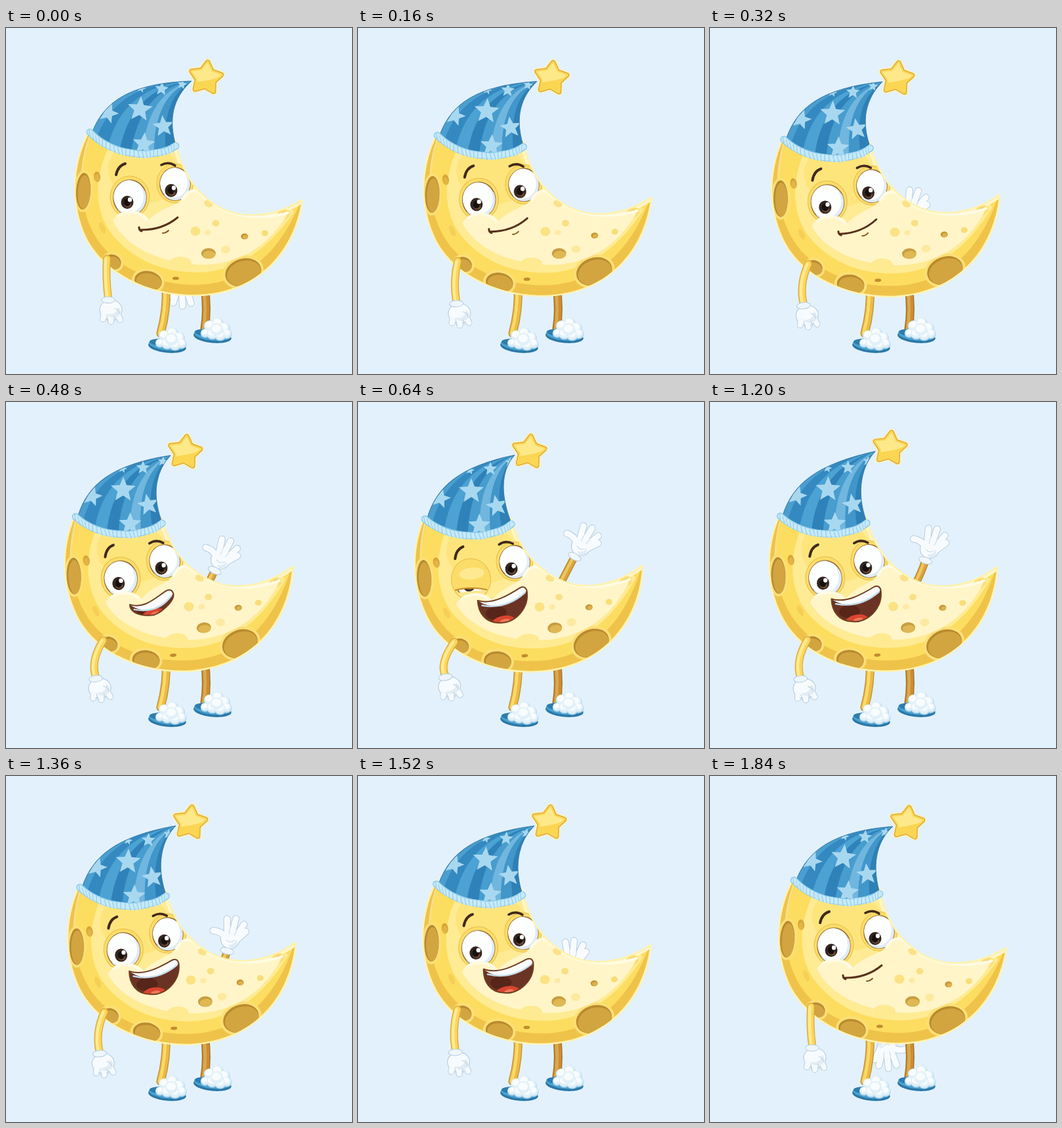
An HTML page with a canvas that plays this animation: 528x528 px, repeating every 1.92 s.

```html
<!DOCTYPE html>
<html lang="en">
<head>
<meta charset="utf-8">
<title>Waving moon</title>
<style>
html, body { margin: 0; width: 100%; height: 100%; overflow: hidden; background: #e3f1fd; }
canvas { display: block; width: 100vw; height: 100vh; }
</style>
</head>
<body>
<canvas id="stage" width="528" height="528"></canvas>
<script>
const ctx = document.getElementById('stage').getContext('2d');
const LOOP = 1920, STEP = 80;
const PIVOT = [310, 430];
const TILT = -0.1;

// Keys are [time, value, ...]
const leanKeys = [[0, 0], [80, .1], [320, .58], [560, .96], [640, 1], [1040, 1], [1360, .58], [1520, .32], [1760, .03], [1840, 0], [1920, 0]];
const starKeys = [[0, 305, 75], [320, 285, 76], [640, 261, 75], [960, 264, 68], [1360, 281, 70], [1520, 291, 70], [1840, 301, 71], [1920, 305, 75]];
const waveKeys = [[0, 268, 372, 175], [160, 285, 345, 110], [320, 299, 297, 18], [480, 318, 258, 25], [640, 330, 237, 28],
  [800, 321, 226, 15], [960, 309, 220, 4], [1120, 324, 230, 20], [1360, 337, 268, 12], [1520, 324, 303, 3],
  [1680, 300, 340, 100], [1760, 272, 380, 165], [1840, 268, 394, 172], [1920, 268, 372, 175]];
const mouthKeys = [[0, 0], [400, 0], [560, 1], [1600, 1], [1760, 0], [1920, 0]];
const winkKeys = [[0, 0], [480, 0], [640, 1], [720, 1], [880, 0], [1920, 0]];

const mix = (a, b, k) => a + (b - a) * k;

function at(keys, t) {
  let i = 1;
  while (i < keys.length - 1 && keys[i][0] < t) i++;
  const a = keys[i - 1], b = keys[i];
  const k = (t - a[0]) / (b[0] - a[0]);
  return a.slice(1).map((v, n) => mix(v, b[n + 1], k));
}

function fill(d, color) {
  ctx.fillStyle = color;
  ctx.fill(typeof d === 'string' ? new Path2D(d) : d);
}

function stroke(d, color, width) {
  ctx.strokeStyle = color;
  ctx.lineWidth = width;
  ctx.stroke(typeof d === 'string' ? new Path2D(d) : d);
}

function oval(x, y, rx, ry, color, turn = 0, edge, width = 1) {
  ctx.beginPath();
  ctx.ellipse(x, y, rx, ry, turn, 0, 7);
  if (color) { ctx.fillStyle = color; ctx.fill(); }
  if (edge) { ctx.strokeStyle = edge; ctx.lineWidth = width; ctx.stroke(); }
}

function starPath(x, y, r, inner, turn) {
  const p = new Path2D();
  for (let i = 0; i < 10; i++) {
    const a = turn + i * Math.PI / 5 - Math.PI / 2, q = i % 2 ? r * inner : r;
    p.lineTo(x + q * Math.cos(a), y + q * Math.sin(a));
  }
  p.closePath();
  return p;
}

function tube(d, edge, base, light, width) {
  stroke(d, edge, width);
  stroke(d, base, width - 2.5);
  ctx.save();
  ctx.translate(-1.5, 0);
  stroke(d, light, width * .35);
  ctx.restore();
}

const moon = new Path2D('M128 158C100 210 100 270 122 318C148 372 215 406 285 407C375 407 437 350 451 264C405 292 355 294 318 270C282 246 264 212 258 172Z');
const cheeks = 'M163 294C170 278 205 272 218 292C240 272 258 273 268 262C278 246 290 244 300 256C330 287 380 298 430 283C400 335 350 364 290 361C225 356 180 330 163 294Z';

function crater(x, y, rx, ry, turn) {
  oval(x, y, rx + 4, ry + 4, '#fbdf76', turn);
  oval(x, y, rx, ry, '#b98a2e', turn);
  oval(x + 1, y + 1.5, rx - 1.5, ry - 2, '#d2a540', turn);
}

function eye(x, y, rx, ry, px, py, wink) {
  oval(x, y - 1, rx + 5, ry + 5, '#fbdc68', 0, '#e8bd48', 1);
  ctx.save();
  oval(x, y, rx, ry, '#fdfefe', 0, '#8f6b35', 1.6);
  ctx.clip();
  oval(x + 5, y + 8, rx, ry, '#e1ebf3');
  oval(x - 2, y - 2, rx - 2, ry - 2, '#fdfefe');
  oval(px, py, 9.5, 10, '#33251f');
  oval(px + 1, py + 4, 5.5, 4, '#6b4a33');
  oval(px, py, 5, 6, '#17100e');
  oval(px + 4, py - 4, 3.2, 3.4, '#fff');
  ctx.restore();
  if (!wink) return;
  ctx.save();
  oval(x, y, rx + 4, ry + 2);
  ctx.clip();
  ctx.beginPath();
  const low = y - ry - 4 + (ry + 16) * wink;
  ctx.moveTo(x - 40, y - 40);
  ctx.lineTo(x - 40, low + 4);
  ctx.quadraticCurveTo(x, low - 8, x + 40, low + 12);
  ctx.lineTo(x + 40, y - 40);
  ctx.fillStyle = '#fbdc68';
  ctx.fill();
  if (wink > .8) {
    ctx.fillStyle = '#fce68b';
    ctx.fillRect(x - 40, low + 5, 80, 40);
    oval(x + 2, y - 10, rx - 6, 9, '#fdea90');
  }
  stroke(`M${x - 40} ${low + 4}Q${x} ${low - 8} ${x + 40} ${low + 12}`, '#c8922f', 2);
  ctx.restore();
}

function mouth(open) {
  if (open < .1) {
    stroke('M203 304Q203 309 207 310M204 308Q238 309 262 289', '#58301b', 3);
    stroke('M239 313Q244 313 248 309', '#8a5a28', 2);
    return;
  }
  const lx = mix(203, 196, open), ly = mix(308, 291, open);
  const rx = mix(262, 272, open), ry = mix(289, 279, open);
  const drop = mix(0, 36, open);
  const top = `M${lx} ${ly}C${lx + 22} ${ly + 9} ${rx - 28} ${ry + 8} ${rx - 10} ${ry - 1}Q${rx - 2} ${ry - 4} ${rx} ${ry + 4}`;
  const shape = new Path2D(`${top}C${rx + 2} ${ry + drop * .9} ${rx - 25} ${ly + drop * 1.15} ${lx + 30} ${ly + drop + 1}C${lx + 8} ${ly + drop} ${lx - 1} ${ly + drop * .5} ${lx} ${ly}Z`);
  fill(shape, '#6b3324');
  ctx.save();
  ctx.clip(shape);
  oval(lx + 26, ly + drop * .6, 16, 10, '#572519');
  oval(lx + 36, ly + drop + 2, 19, 11, '#d9452f', -.1);
  oval(lx + 38, ly + drop, 8, 4, '#f0795a', -.15);
  fill(`${top}C${rx - 10} ${ry + 17} ${lx + 26} ${ly + 23} ${lx} ${ly}Z`, '#fafcfd');
  stroke(`M${lx + 6} ${ly + 8}Q${lx + 42} ${ly + 18} ${rx - 3} ${ry + 7}`, '#c5dcea', 2.5);
  ctx.restore();
  stroke(shape, '#703e20', 2);
}

function body(open, wink) {
  stroke(moon, '#fff3b0', 5);
  fill(moon, '#efc34a');
  ctx.save();
  ctx.clip(moon);
  fill('M136 150C107 220 111 270 134 314C162 364 225 392 290 392C362 390 415 348 449 266L420 200L258 140Z', '#fddd5f');
  fill('M158 180C130 235 138 285 162 315C192 352 235 373 295 373C355 371 402 335 440 280L360 220L258 150Z', '#feeb93');
  oval(210, 220, 55, 45, '#fde57c', .3);
  stroke('M128 165C113 208 112 245 120 278', '#f8e08a', 3);
  stroke('M258 172C264 212 282 246 318 270C355 294 405 292 451 264', '#fff6c9', 8);

  crater(118, 249, 11, 28, .05);
  oval(139, 227, 5, 8, '#d7a53c', -.1);
  oval(139, 229, 3.5, 6, '#e3b548', -.1);
  crater(163, 357, 13, 11, .5);
  crater(217, 386, 21, 15, .2);
  crater(362, 373, 28, 21, -.3);
  crater(423, 285, 7, 3.5, -.4);
  oval(259, 382, 5, 2.5, '#c28d31');
  oval(147, 305, 4, 9, '#f5cf58', -.4);
  eye(189, 259, 25, 27, 185, 266, wink);
  eye(258, 238, 23, 25, 252, 248, 0);

  fill(cheeks, '#fff5c8');
  stroke('M172 286C184 278 205 280 214 292M269 262C278 246 290 244 300 256C330 285 380 296 430 282', '#fffbe3', 4);
  oval(266, 359, 17, 10, '#fdea91');
  oval(289, 310, 7.5, 7, '#fbe283');
  oval(320, 298, 5.5, 5, '#fae084');
  oval(309, 268, 7, 5, '#fae28a', .5);
  oval(308, 312, 5, 4, '#fdeaa4');
  oval(335, 338, 7, 6, '#fdeaa0');
  oval(395, 313, 5, 4.5, '#f9dd75');
  oval(309, 344, 11, 8, '#c99d3e');
  oval(310, 346, 9.5, 6, '#dfb853');
  oval(364, 318, 5.5, 4.5, '#c69535');
  oval(365, 319, 4, 3, '#ddb04b');
  ctx.restore();

  stroke('M168 224Q171 210 182 207', '#42291c', 4);
  stroke('M237 209Q248 203 258 210', '#42291c', 3.6);
  mouth(open);
}

function hat(tx, ty) {
  const shape = new Path2D(`M132 158C150 112 190 84 ${tx} ${ty}C${tx - 22} ${ty + 20} 246 130 258 175C230 200 165 193 132 158Z`);
  const tones = ['#4a9fd0', '#3489c0', '#4ba2d3', '#2f82b9', '#479dce', '#70b6de', '#4196ca', '#2e80b6'];
  ctx.save();
  ctx.clip(shape);
  fill(shape, '#3d93c8');
  tones.forEach((tone, i) => {
    const side = n => {
      const k = n / tones.length;
      return [mix(118, 262, k), mix(162, 182, k) + 28 * Math.sin(k * Math.PI), mix(152, 248, k), mix(78, 112, k)];
    };
    const a = side(i), b = side(i + 1);
    fill(`M${a[0]} ${a[1]}Q${a[2]} ${a[3]} ${tx} ${ty}Q${b[2]} ${b[3]} ${b[0]} ${b[1]}Z`, tone);
  });
  const slide = (tx - 281) * .3;
  [[204, 124, 20, .1], [237, 93, 11, .1], [240, 150, 17, -.1], [156, 130, 16, .35], [210, 177, 18, .1], [206, 92, 7, .3], [268, 86, 8, .2]]
    .forEach(([x, y, r, a]) => fill(starPath(x + slide * (180 - y) / 100, y, r, .44, a), '#a8d8f0'));
  ctx.restore();
  stroke(shape, '#3c7da7', 1);

  const brim = 'M128 159C163 196 226 201 259 180';
  stroke(brim, '#8fcbe9', 11);
  stroke(brim, '#c4e8f8', 8);
  for (let i = 0; i <= 70; i++) {
    const k = i / 70, j = 1 - k;
    const x = j ** 3 * 128 + 3 * j * j * k * 163 + 3 * j * k * k * 226 + k ** 3 * 259;
    const y = j ** 3 * 159 + 3 * j * j * k * 196 + 3 * j * k * k * 201 + k ** 3 * 180;
    const s = Math.sin(i * 12.9);
    stroke(`M${x - 1} ${y - 4 + s}L${x + 1.5 * s} ${y + 5 + s}`, i % 3 ? '#c9ebfa' : '#9ad2ee', 1.5);
  }
}

function goldStar(x, y) {
  const p = starPath(x, y + 1, 24, .56, .12);
  stroke(p, '#fff0b0', 11);
  stroke(p, '#d7a338', 7.5);
  stroke(p, '#fbd653', 5);
  fill(p, '#fbd653');
  ctx.save();
  ctx.clip(p);
  fill(`M${x - 30} ${y - 30}H${x + 30}V${y - 4}Q${x + 4} ${y + 8} ${x - 30} ${y + 8}Z`, '#fde98a');
  ctx.restore();
}

function waveArm(x, y, deg) {
  const a = deg * Math.PI / 180;
  tube(`M285 325Q${x - 36 * Math.sin(a)} ${y + 36 * Math.cos(a)} ${x} ${y}`, '#b9822c', '#d9a440', '#efc85c', 12);
  ctx.save();
  ctx.translate(x, y);
  ctx.rotate(a);
  const fingers = 'M-5 -26L-10 -49M2 -26L3 -52M8 -24L17 -46M9 -18L22 -36M-4 -19Q-14 -29 -27 -27';
  stroke(fingers, '#b9cedd', 11);
  oval(1, -20, 14.5, 15, '#f8fbfd', 0, '#b9cedd', 1.2);
  stroke(fingers, '#f8fbfd', 9);
  oval(6, -15, 7, 8, '#e2ecf4');
  oval(0, -21, 10, 10, '#f8fbfd');
  stroke('M-4 -17Q2 -13 8 -19M-2 -27L-3 -35M6 -27L8 -34', '#cfdee9', 1.2);
  oval(0, -1, 10.5, 5, '#f0f7fc', 0, '#b7cddd', 1);
  ctx.restore();
}

function sideArm(p) {
  const x = mix(156, 133, p), y = mix(413, 418, p) + 6 * Math.sin(p * Math.PI) ;
  tube(`M${mix(154, 147, p)} ${mix(352, 366, p)}Q${mix(152, 124, p)} ${mix(382, 398, p)} ${x} ${y - 1}`, '#dca63a', '#fbd65a', '#fdeb92', 12);
  ctx.save();
  ctx.translate(x, y);
  ctx.rotate(mix(0, -.16, p));
  stroke('M-6 22L-8 31M4 23L4 35M13 20L18 32', '#b9cedd', 10);
  oval(4, 17, 17, 15, '#f8fbfd', 0, '#b9cedd', 1.2);
  stroke('M-6 22L-8 31M4 23L4 35M13 20L18 32', '#f4f9fc', 8);
  oval(8, 20, 11, 9, '#e2ecf4');
  oval(2, 14, 12, 10, '#f8fbfd');
  stroke('M-2 26L-1 35M9 27L11 34M10 15Q16 17 17 23', '#c2d4e1', 1.3);
  oval(0, 2, 10.5, 5, '#eef6fc', 0, '#b7cddd', 1);
  ctx.restore();
}

function slipper(x, y) {
  oval(x, y + 2, 29, 9.5, '#2b78a6', .1);
  oval(x, y - 1, 28, 9, '#4ba3d2', .1);
  oval(x - 12, y - 4, 15, 5, '#2d7daf', .1);
  const puffs = [[-11, -2, 7], [-4, -13, 9], [8, -17, 9], [18, -10, 9], [22, -1, 8], [12, 1, 9], [0, -1, 9], [7, -7, 11]];
  puffs.forEach(([a, b, r]) => oval(x + a, y + b - 1, r, r * .95, '#bcdcee'));
  puffs.forEach(([a, b, r]) => {
    oval(x + a - .5, y + b - 2, r - 1, r - 1.5, '#e2f1f9');
    oval(x + a - 1, y + b - 3.5, r * .65, r * .55, '#f9fcfd');
  });
}

function legs() {
  tube('M303 395Q308 430 303 460', '#a56b22', '#c88e35', '#dca94a', 13);
  slipper(315, 469);
  tube('M244 395Q246 430 236 466', '#c38c30', '#eabb47', '#fbda67', 13);
  slipper(246, 484);
}

function draw(t) {
  const [p] = at(leanKeys, t), [sx, sy] = at(starKeys, t);
  const a = TILT * p;
  ctx.fillStyle = '#e3f1fd';
  ctx.fillRect(0, 0, 528, 528);
  ctx.lineCap = ctx.lineJoin = 'round';
  waveArm(...at(waveKeys, t));
  legs();

  ctx.save();
  ctx.translate(...PIVOT);
  ctx.rotate(a);
  ctx.translate(-PIVOT[0], -PIVOT[1]);
  body(at(mouthKeys, t)[0], at(winkKeys, t)[0]);
  const dx = sx - 22 - PIVOT[0], dy = sy + 6 - PIVOT[1];
  hat(PIVOT[0] + dx * Math.cos(a) + dy * Math.sin(a), PIVOT[1] - dx * Math.sin(a) + dy * Math.cos(a));
  ctx.restore();

  goldStar(sx, sy);
  sideArm(p);
}

const start = performance.now();
function tick() {
  const t = (performance.now() - start) % LOOP;
  draw(Math.floor(t / STEP) * STEP);
  requestAnimationFrame(tick);
}
tick();
</script>
</body>
</html>
```
